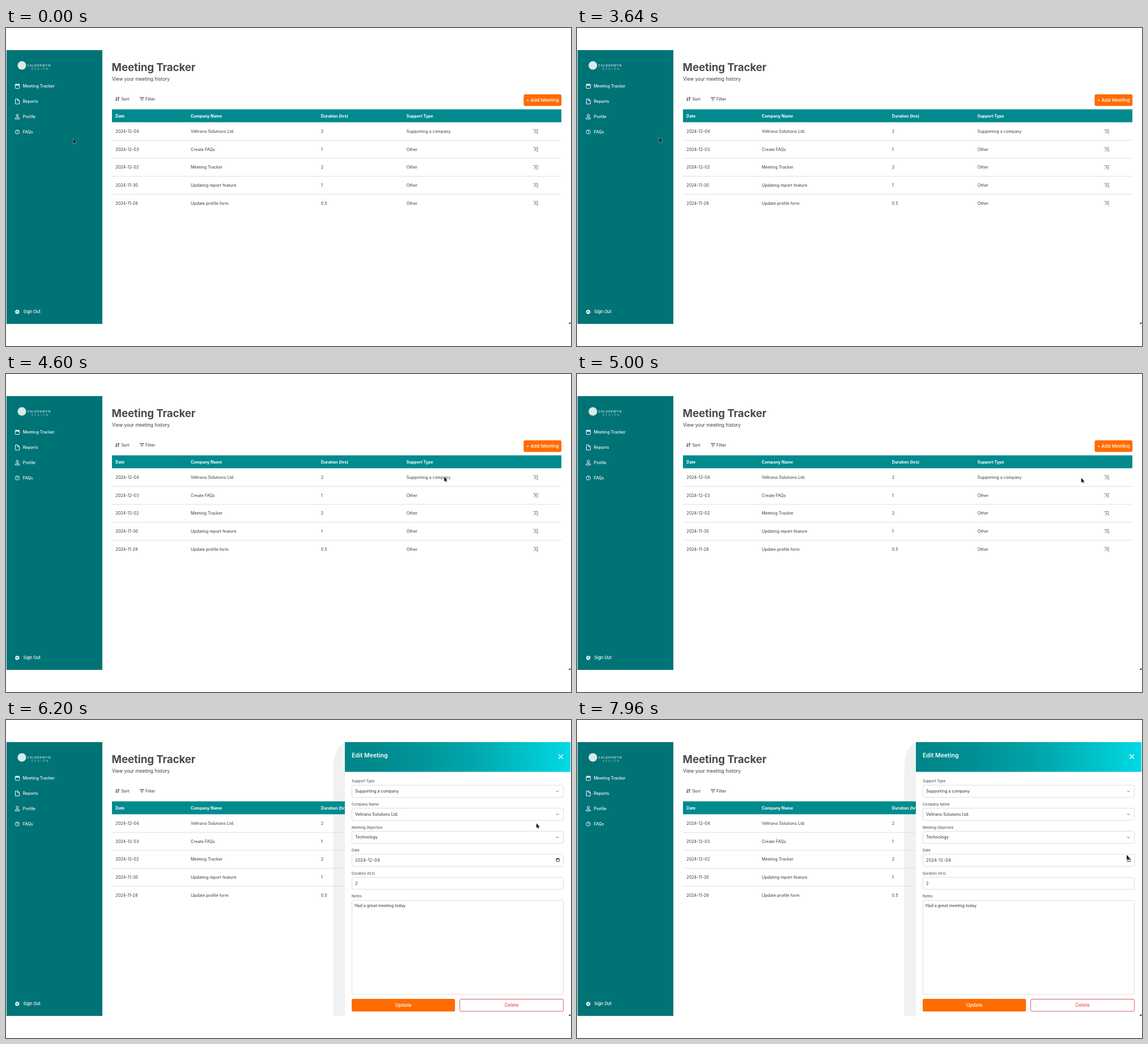
Write an HTML page that moves like this. It is 997 px wide and 561 px high and loops after 8000 ms.

```html
<!DOCTYPE html>
<html lang="en">
<head>
<meta charset="utf-8">
<title>Meeting tracker</title>
<style>
html, body { margin: 0; width: 100%; height: 100%; overflow: hidden; background: #fff; }
svg { display: block; width: 100vw; height: 100vh; }
text { font-family: Inter, "Open Sans", sans-serif; white-space: pre; }
</style>
</head>
<body>
<svg id="stage" viewBox="0 0 997 561">
  <defs>
    <linearGradient id="banner">
      <stop offset="0" stop-color="#008589"/>
      <stop offset=".25" stop-color="#008f93"/>
      <stop offset=".52" stop-color="#00a2a7"/>
      <stop offset=".78" stop-color="#00bfc7"/>
      <stop offset="1" stop-color="#02d9e5"/>
    </linearGradient>
    <g id="open" fill="none" stroke="#666" stroke-width=".8">
      <path d="M-3.4 -1.6V-3.3H3.3V3.5H1.4M-3.4 3.5L.6 -.5M-2 -.6H.7V2.1"/>
    </g>
    <path id="chevron" d="M-2 -1L0 1L2 -1" fill="none" stroke="#444" stroke-width=".9"/>
  </defs>
  <rect width="997" height="561" fill="#fff"/>

  <g id="sidebar">
    <rect x="1" y="39" width="169" height="483" fill="#007377"/>
    <circle cx="28" cy="66" r="7.6" fill="#d9eaea"/>
    <g fill="none" stroke="#fff" stroke-width="1">
      <rect x="16.3" y="99.4" width="7.4" height="7.2" rx="1"/>
      <path d="M16.3 100.7H23.7M18 98.2V100M22 98.2V100" stroke-width="1.4"/>
      <path d="M16.6 125.2H20.8L23.6 128V134H16.6ZM20.6 125.2V128.2H23.6"/>
      <circle cx="20" cy="154.2" r="2"/>
      <path d="M16.2 160.4V159.6Q16.4 157.8 18.2 157.8H21.8Q23.6 157.8 23.8 159.6V160.4Z"/>
      <circle cx="20" cy="183.4" r="3.7" stroke-width=".9"/>
      <path d="M18.8 182.5Q18.9 181.3 20 181.3T21.2 182.4Q21.1 183.2 20 183.5V184.2M20 185V185.7" stroke-width=".8"/>
      <circle cx="19.8" cy="500.8" r="2.2" stroke-width="1.8"/>
      <circle cx="19.8" cy="500.8" r="3.4" stroke-width="1.2" stroke-dasharray="1.9 1.66"/>
    </g>
  </g>

  <path id="backdrop" d="M598 40Q589 42 583 55Q577.5 68 577.5 92V522H598Z" fill="#f1f1f1"/>

  <g id="page">
    <g fill="none" stroke="#333" stroke-width="1">
      <path d="M194.7 121.8V128M192.9 126.3L194.7 128.2L196.5 126.3M198.3 128.4V122.2M196.5 124L198.3 122L200.1 124"/>
      <path d="M235.8 122.6H244M237.4 125.2H242.4M238.9 127.8H240.9"/>
    </g>
    <rect x="913.4" y="117" width="66.8" height="20.4" rx="3" fill="#ff6b00"/>
    <rect x="187" y="143.5" width="793" height="22.8" fill="#008b8e"/>
  </g>

  <g id="panel">
    <rect x="598" y="39" width="398" height="483" fill="#fff"/>
    <rect x="598" y="39" width="398" height="52.5" fill="url(#banner)"/>
    <path d="M975.2 61L982.8 68.6M982.8 61L975.2 68.6" stroke="#fff" stroke-width="1.4"/>
    <rect x="610" y="492" width="182.3" height="22.3" rx="2.5" fill="#ff6b00"/>
    <rect x="800.6" y="492.5" width="183" height="21.4" rx="2.5" fill="#fff" stroke="#e45863"/>
    <rect x="971" y="244.7" width="5.3" height="5" rx=".6" fill="none" stroke="#222" stroke-width=".9"/>
    <path d="M970.8 245.2H976.5M972.2 243.6V245M975.1 243.6V245" stroke="#222" stroke-width="1.1"/>
  </g>

  <path d="M992.5 522L996 518.8V522Z" fill="#222"/>
  <path id="cursor" d="M0 0V8.4L1.9 6.7L3.1 9.4L4.4 8.9L3.2 6.2H5.8Z"
        fill="#111" stroke="#fff" stroke-width=".7" paint-order="stroke"/>
</svg>
<script>
const LOOP = 8000, STEP = 40, OPEN_AT = 6200;
const COMPANY = "Veltrano Solutions Ltd.";
const $ = id => document.getElementById(id);

function add(parent, tag, attrs, content = "") {
  const el = document.createElementNS("http://www.w3.org/2000/svg", tag);
  for (const key in attrs) el.setAttribute(key, attrs[key]);
  el.textContent = content;
  parent.append(el);
  return el;
}

function label(parent, x, y, content, size, fill, weight = 400, extra = {}) {
  return add(parent, "text", { x, y, "font-size": size, fill, "font-weight": weight, ...extra }, content);
}

function buildSidebar() {
  const side = $("sidebar");
  label(side, 37.5, 68.3, "CALDERWYN", 5.4, "#d9eaea", 500, { "letter-spacing": 0.8 });
  label(side, 45, 74.2, "REGION", 4.5, "#a9cfd0", 400, { "letter-spacing": 2.5 });
  ["Meeting Tracker", "Reports", "Profile", "FAQs"].forEach((name, i) =>
    label(side, 29.8, 105.3 + i * 26.95, name, 7.2, "#fff", 500));
  label(side, 30.5, 503.2, "Sign Out", 7.4, "#fff", 500);
}

function buildPage() {
  const page = $("page");
  const columns = [193.3, 326, 555.8, 706.8];
  const rows = [
    ["2024-12-04", COMPANY, "2", "Supporting a company"],
    ["2024-12-03", "Create FAQs", "1", "Other"],
    ["2024-12-02", "Meeting Tracker", "2", "Other"],
    ["2024-11-30", "Updating report feature", "1", "Other"],
    ["2024-11-28", "Update profile form", "0.5", "Other"]
  ];
  label(page, 186.6, 76, "Meeting Tracker", 18.7, "#4a4a4a", 700, { "letter-spacing": -0.1 });
  label(page, 187, 92.8, "View your meeting history", 8.29, "#3c3c3c");
  label(page, 203.4, 127.7, "Sort", 7.3, "#333");
  label(page, 246, 127.7, "Filter", 7.3, "#333");
  label(page, 946.8, 130.2, "+ Add Meeting", 8.2, "#fff", 500, { "text-anchor": "middle" });
  ["Date", "Company Name", "Duration (hrs)", "Support Type"].forEach((name, i) =>
    label(page, columns[i], 157.7, name, 7.1, "#fff", 700));
  rows.forEach((row, r) => {
    const y = 182.5 + r * 31.65;
    row.forEach((cell, c) => label(page, columns[c], y + 2.6, cell, 7.25, "#3a3a3a"));
    add(page, "use", { href: "#open", x: 934.8, y });
    if (r < 4) add(page, "path", { d: `M187 ${y + 15.8}H980`, stroke: "#dedede", "stroke-width": 1 });
  });
}

function buildPanel() {
  const panel = $("panel");
  const fields = [
    ["Support Type", "Supporting a company"],
    ["Company Name", COMPANY],
    ["Meeting Objective", "Technology"],
    ["Date", "2024-12-04"],
    ["Duration (hrs)", "2"]
  ];
  const box = (y, height) => add(panel, "rect", {
    x: 610.5, y, width: 373, height, rx: 2.5, fill: "none", stroke: "#dcdcdc"
  });
  label(panel, 610, 65.5, "Edit Meeting", 10.5, "#fff", 600);
  fields.forEach(([name, value], i) => {
    const y = 125.6 + i * 40.6;
    label(panel, 610, y - 15.2, name, 6.3, "#444");
    box(y - 10.6, 21.4);
    label(panel, 616, y + 2.6, value, 7.2, "#2e2e2e", 400, i === 3 ? { "letter-spacing": 0.3 } : {});
    if (i < 3) add(panel, "use", { href: "#chevron", x: 973, y: y + 0.2 });
  });
  label(panel, 610, 313.4, "Notes", 6.3, "#444");
  box(318.2, 165.8);
  label(panel, 615, 330.4, "Had a great meeting today", 7.2, "#2e2e2e");
  label(panel, 701.2, 506.4, "Update", 8.25, "#fff", 500, { "text-anchor": "middle" });
  label(panel, 892.3, 506.4, "Delete", 8.25, "#de3f4c", 400, { "text-anchor": "middle" });
}

// time, x, y, horizontal speed in px per ms
const PATH = [
  [3480, 118.6, 195.4, 0], [4200, 508.5, 179.5, 0.82], [4320, 608, 180, 0.8],
  [5000, 889.8, 183.2, 0.24], [5160, 916, 184, 0.14], [5360, 936, 182.3, 0],
  [7200, 936, 182.3, 0], [7400, 936, 187, 0], [7520, 936, 187, 0], [7960, 970, 238, 0]
];

function cursorAt(t) {
  const end = PATH.findIndex(key => key[0] > t);
  if (end === 0) return PATH[0].slice(1, 3);
  if (end < 0) return PATH[PATH.length - 1].slice(1, 3);
  const [t0, x0, y0, v0] = PATH[end - 1], [t1, x1, y1, v1] = PATH[end];
  const span = t1 - t0, u = (t - t0) / span, ease = u * u * (3 - 2 * u);
  const swing = span * u * (1 - u) * ((1 - u) * v0 - u * v1);
  return [x0 + (x1 - x0) * ease + swing, y0 + (y1 - y0) * ease];
}

function draw(now) {
  const t = Math.floor((now % LOOP) / STEP) * STEP;
  const display = t >= OPEN_AT ? "inline" : "none";
  $("panel").style.display = $("backdrop").style.display = display;
  $("cursor").setAttribute("transform", `translate(${cursorAt(t)})`);
}

buildSidebar();
buildPage();
buildPanel();
const start = performance.now();
function tick() {
  draw(performance.now() - start);
  requestAnimationFrame(tick);
}
tick();
</script>
</body>
</html>
```
